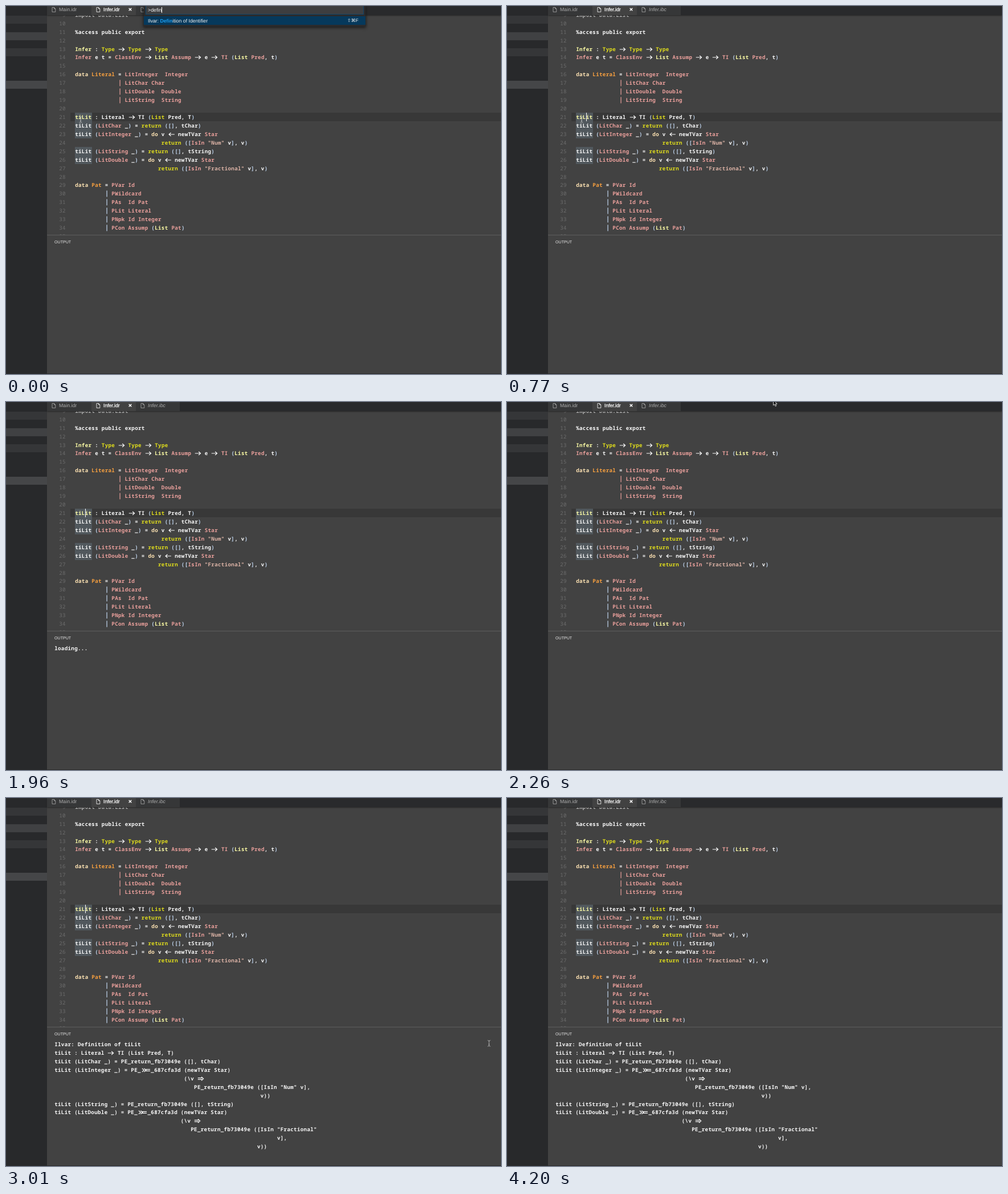
An HTML page that plays this animation: 869 px wide and 645 px high, repeating every 4.3 s.

```html
<!DOCTYPE html>
<html lang="en">
<head>
<meta charset="utf-8">
<title>Editor: show definition</title>
<style>
html, body { margin: 0; width: 100%; height: 100%; overflow: hidden; background: #424242; }
#stage { position: absolute; left: 0; top: 0; width: 869px; height: 645px; overflow: hidden;
  background: #424242; text-rendering: geometricPrecision; }
#stage div, #stage > svg { position: absolute; }
.line { white-space: pre; height: 15px; color: #f8f8f8; text-indent: .16px;
  font: 600 9.2px/15px "Noto Sans Mono", monospace; letter-spacing: .32px; }
.line svg { height: 8px; vertical-align: -1px; overflow: visible; stroke-width: 1.2; }
.line svg, #tabs svg { fill: none; stroke: currentColor; }
.ui { white-space: pre; color: #f4f4f4; font: 8.8px/12px "Liberation Sans", Arial, sans-serif; }
.num { color: #6c6c6c; font-weight: 400; }
.mark { background: #51585d; width: 29.5px; height: 15px; left: 121px; }
.p { color: #eba09c; }
.y { color: #e0dd1c; }
.l { color: #ffffa6; font-weight: 700; }
.k { color: #ffe3b3; font-weight: 700; }
.o { color: #f9a03f; font-weight: 700; }
.w { color: #fff; font-weight: 700; }
.b { color: #c3d8f2; }
.s { color: #dcb3a6; }
.d { color: #c4c4c4; }
#side { left: 0; top: 0; width: 72px; height: 645px; background: #28292b; }
#side div { left: 0; width: 72px; height: 14px; }
#tabs { left: 72px; top: 0; width: 797px; height: 16px; background: #292a2c; box-shadow: 0 1px 2px #262626; }
#tabs .tab { top: 0; height: 16px; background: #363738; }
#panel { left: 72px; top: 401px; width: 797px; height: 243px; background: #424242;
  border-top: 1px solid #5e5e5e; box-sizing: border-box; }
#palette { left: 242px; top: 0; width: 389px; height: 36px; background: #2a2b2d; box-shadow: 0 1px 5px 1px #1a1a1a; }
#field { left: 3px; top: -4px; width: 381px; height: 17px; background: #3d3e40; border: 1px solid #13486c; box-sizing: content-box; }
#row { left: 0; top: 18px; width: 389px; height: 15px; background: #06395c; }
#row b { color: #1b9df0; }
#caret { left: 139px; top: 187px; width: 1px; height: 15px; background: #fff; }
</style>
</head>
<body>
<div id="stage"></div>
<script>
const LOOP = 4300, CHAR = 5.84, PITCH = 14.93;

// Colour spans are written as class`text`.
const CODE = [
  "d`import Data.List`",
  "",
  "w`%access` public export",
  "",
  "l`Infer` : y`Type` -> y`Type` -> y`Type`",
  "p`Infer` e t = p`ClassEnv` -> l`List` p`Assump` -> e -> p`TI` b`(`l`List` p`Pred`, tb`)`",
  "",
  "k`data` o`Literal` = p`LitInteger  Integer`",
  "             p`| LitChar Char`",
  "             p`| LitDouble  Double`",
  "             p`| LitString  String`",
  "",
  "l`tiLit` : Literal -> TI b`(`y`List` Pred, Tb`)`",
  "tiLit b`(`p`LitChar` _b`)` = y`return` b`([]`, tCharb`)`",
  "tiLit b`(`p`LitInteger` _b`)` = k`do` v <- newTVar p`Star`",
  "                          y`return` b`([`p`IsIn` s`\"Num\"` vb`]`, vb`)`",
  "tiLit b`(`p`LitString` _b`)` = y`return` b`([]`, tStringb`)`",
  "tiLit b`(`p`LitDouble` _b`)` = k`do` v <- newTVar p`Star`",
  "                         y`return` b`([`p`IsIn` s`\"Fractional\"` vb`]`, vb`)`",
  "",
  "k`data` o`Pat` = p`PVar Id`",
  "         b`|` p`PWildcard`",
  "         b`|` p`PAs  Id Pat`",
  "         b`|` p`PLit Literal`",
  "         b`|` p`PNpk Id Integer`",
  "         b`|` p`PCon Assump` b`(`l`List` p`Pat`b`)`",
  ""
];

const pad = (n, text) => " ".repeat(n) + text;
const RESULT = [
  "Ilvar: Definition of tiLit",
  "tiLit : Literal -> TI (List Pred, T)",
  "tiLit (LitChar _) = PE_return_fb73049e ([], tChar)",
  "tiLit (LitInteger _) = PE_>>=_687cfa3d (newTVar Star)",
  pad(39, "(\\v =>"),
  pad(42, "PE_return_fb73049e ([IsIn \"Num\" v],"),
  pad(62, "v))"),
  "tiLit (LitString _) = PE_return_fb73049e ([], tString)",
  "tiLit (LitDouble _) = PE_>>=_687cfa3d (newTVar Star)",
  pad(38, "(\\v =>"),
  pad(41, "PE_return_fb73049e ([IsIn \"Fractional\""),
  pad(67, "v],"),
  pad(61, "v))")
];

const LIGATURES = {
  "->": "M.8 4H10.6M7.2 1L10.6 4L7.2 7",
  "<-": "M10.9 4H1.1M4.5 1L1.1 4L4.5 7",
  "=>": "M.8 2.7H9M.8 5.3H9M7 .8L10.7 4L7 7.2",
  ">>=": "M2 1L5.4 4L2 7M5.4 1L8.8 4L5.4 7M8 2.7H16M8 5.3H16",
  "|": "M3.1 -1.5V9.5"
};

const stage = document.getElementById("stage");

function add(parent, css, html = "", cls = "", id = "") {
  const el = document.createElement("div");
  el.style.cssText = css;
  el.innerHTML = html;
  el.className = cls;
  if (id) el.id = id;
  parent.append(el);
  return el;
}

function ligature(op) {
  const width = op.length * CHAR;
  return `<svg style="width:${width}px" viewBox="0 0 ${width} 8"><path d="${LIGATURES[op]}"/></svg>`;
}

const escape = s => s.replace(/&/g, "&amp;").replace(/</g, "&lt;").replace(/>/g, "&gt;");
const markup = s => s.split(/(>>=|->|<-|=>|\|)/)
  .map(part => LIGATURES[part] ? ligature(part) : escape(part)).join("")
  .replace(/([a-z])`([^`]*)`/g, '<span class="$1">$2</span>');

const textLine = (parent, x, y, text, cls = "") =>
  add(parent, `left:${x}px;top:${y}px`, markup(text), "line " + cls);

const label = (parent, x, y, html, css = "") =>
  add(parent, `left:${x}px;top:${y}px;${css}`, html, "ui");

// Editor
const lineTop = n => 187 + (n - 21) * PITCH;
add(stage, "left:113px;top:187px;width:756px;height:15px;background:#383838");
[21, 22, 23, 25, 26].forEach(n => add(stage, `top:${lineTop(n)}px`, "", "mark"));
CODE.forEach((text, i) => {
  const n = i + 9;
  textLine(stage, n < 10 ? 93 + CHAR : 93, lineTop(n), String(n), "num");
  textLine(stage, 121, lineTop(n), text);
});
const caret = add(stage, "", "", "", "caret");

// Sidebar
const side = add(stage, "", "", "", "side");
[[17, "#353638"], [45.5, "#404143"], [74, "#353638"], [131, "#454648"]]
  .forEach(([y, c]) => add(side, `top:${y}px;background:${c}`));

// Tabs
const tabs = add(stage, "", "", "", "tabs");
[[0, 78, "Main.idr", "color:#adadad"],
 [78, 78, "Infer.idr", "color:#fff;-webkit-text-stroke:.25px #fff;font-size:8.6px"],
 [156, 77, "Infer.ibc", "color:#adadad;font-style:italic"]].forEach(([x, w, name, css], i) => {
  const tab = add(tabs, `left:${x}px;width:${w}px;${i === 1 ? "background:#424242" : ""}`, "", "tab");
  add(tab, `left:8px;top:2px;width:8px;height:9px;${css}`,
    '<svg width="8" height="9" style="display:block"><path stroke-width=".8" d="M1 .5H4.5L6.8 2.8V8.4H1ZM4.5 .5V2.8H6.8"/></svg>');
  label(tab, 21, 0, name, css);
});
add(tabs, "left:143px;top:3px;color:#fff",
  '<svg width="6" height="6" style="display:block"><path stroke-width="1.4" d="M.7 .7L5.3 5.3M5.3 .7L.7 5.3"/></svg>');

// Output panel
const panel = add(stage, "", "", "", "panel");
label(panel, 13, 5.5, "OUTPUT", "font-size:7.1px;color:#ececec");
const loading = textLine(panel, 13, 22, "loading...");
const result = add(panel, "left:13px;top:22px");
RESULT.forEach((text, i) => textLine(result, 0, i * PITCH, text));
add(stage, "left:72px;top:644px;width:797px;height:1px;background:#2b2b2b");

// Command palette
const palette = add(stage, "", "", "", "palette");
const field = add(palette, "", "", "", "field");
const query = label(field, 3, 4, "");
const row = add(palette, "", "", "", "row");
const match = label(row, 7, 2, "", "font-size:8.75px");
label(row, 357, 2, "⇧⌘F", "font:8px/12px 'Liberation Sans','DejaVu Sans',sans-serif");

// Pointers
function pointer(w, h, path) {
  stage.insertAdjacentHTML("beforeend", `<svg width="${w}" height="${h}">${path}</svg>`);
  return stage.lastElementChild;
}
const beam = pointer(6, 12,
  '<path d="M.5 .8Q3 .8 3 2.4Q3 .8 5.5 .8M3 2V10M.5 11.2Q3 11.2 3 9.6Q3 11.2 5.5 11.2M2 7.6H4" fill="none" stroke="#d0d0d0" stroke-width=".7"/>');
const arrow = pointer(9, 13,
  '<path d="M.6 .8V9.8L2.7 7.9L4.2 11.4L5.8 10.7L4.3 7.3H7.2Z" fill="#111" stroke="#fff" stroke-width=".8"/>');

// Step tables: [start, value...]
const TYPED = [[0, "defin"], [150, "defini"], [330, "definit"], [770, ""]];
const CARET = [[0, 0], [770, 1], [1210, 0], [1660, 1], [2260, 0], [2710, 1], [3310, 0], [3750, 1], [4200, 0]];
const OUTPUT = [[0, ""], [1070, "loading"], [2110, ""], [2410, "result"]];
const POINTER = [
  [0, beam, 128, 193], [1960], [2110, beam, 215, 84], [2260, arrow, 467, -4],
  [2410, arrow, 594, 13], [2560, beam, 766, 164.5], [2710], [3010, beam, 844.5, 424],
  [3160, beam, 805, 464], [3310, beam, 807, 528.5], [3460, beam, 851, 596.5],
  [3610, beam, 859, 627], [3750, beam, 859, 637], [3900]
];

const at = (steps, t) => steps.findLast(s => s[0] <= t);
const show = (el, on) => { el.style.visibility = on ? "visible" : "hidden"; };

let lastTyped;
function setTyped(text) {
  if (text === lastTyped) return;
  lastTyped = text;
  palette.style.display = text ? "block" : "none";
  query.innerHTML = `&gt;${text}<span style="display:inline-block;width:1px;height:10px;background:#fff;vertical-align:-2px"></span>`;
  const full = "Definition";
  match.innerHTML = `Ilvar: <b>${full.slice(0, text.length)}</b>${full.slice(text.length)} of Identifier`;
}

function draw(t) {
  setTyped(at(TYPED, t)[1]);
  show(caret, at(CARET, t)[1]);
  const output = at(OUTPUT, t)[1];
  show(loading, output === "loading");
  show(result, output === "result");
  const [, shape, x, y] = at(POINTER, t);
  for (const el of [beam, arrow]) show(el, el === shape);
  if (shape) {
    shape.style.left = x + "px";
    shape.style.top = y + "px";
  }
}

const start = performance.now();
function tick() {
  draw((performance.now() - start) % LOOP);
  requestAnimationFrame(tick);
}
tick();
</script>
</body>
</html>
```
